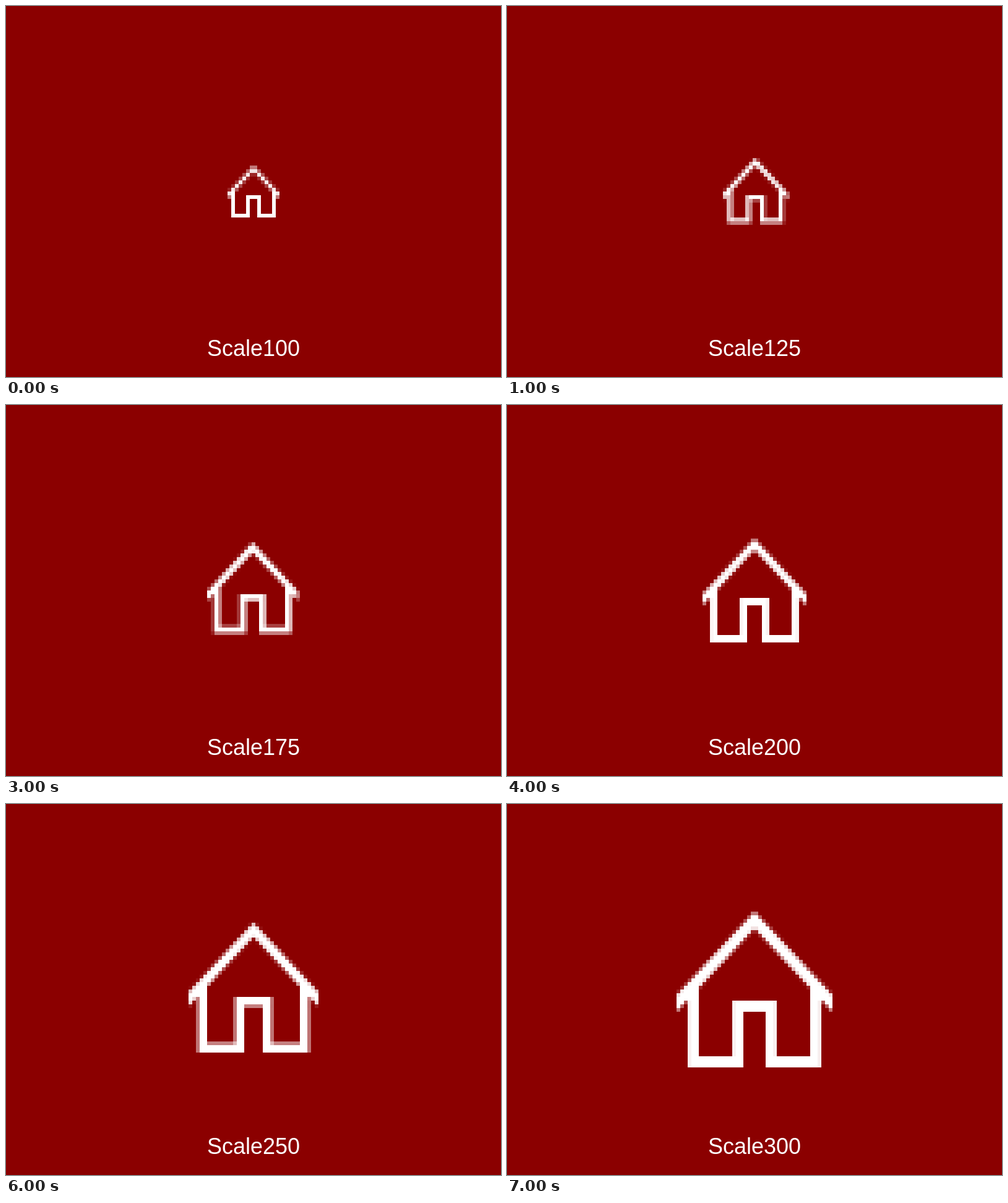
Write an HTML page with a canvas that moves like this. It is 800 by 600 pixels and loops after 8000 ms.

```html
<!DOCTYPE html>
<html lang="en">
<head>
<meta charset="utf-8">
<title>Icon scaling</title>
<style>
  html, body { margin: 0; width: 800px; height: 600px; overflow: hidden; background: #8b0000; }
  canvas { display: block; }
</style>
</head>
<body>
<canvas id="stage" width="800" height="600"></canvas>
<script>
const STEP_MS = 1000;
const ZOOM = 6;
// Scale in percent and left edge of the icon on the stage
const STEPS = [[100, 358], [125, 349], [150, 337], [175, 325],
               [200, 316], [225, 306], [250, 295], [300, 274]];

const ctx = document.getElementById('stage').getContext('2d');
const icon = document.createElement('canvas');
icon.width = icon.height = 48;
const pen = icon.getContext('2d');

// House outline on a 14 x 14 unit grid
const house = new Path2D('M0 7.5 L7 0 L14 7.5 V9 L7 1.5 L0 9 Z');
function addBar(left, top, right, bottom) {
  house.rect(left, top, right - left, bottom - top);
}
addBar(1.02, 6.7, 2, 14);
addBar(12, 6.7, 12.98, 14);
addBar(1.02, 13, 6, 14);
addBar(8, 13, 12.98, 14);
addBar(5.02, 8, 6, 14);
addBar(8, 8, 8.98, 14);
addBar(5.02, 8, 8.98, 9);

function drawIcon(scale) {
  pen.setTransform(1, 0, 0, 1, 0, 0);
  pen.clearRect(0, 0, icon.width, icon.height);
  pen.scale(scale, scale);
  pen.fillStyle = '#fff';
  pen.fill(house);
}

function draw(step) {
  const [percent, left] = STEPS[step];
  const scale = percent / 100;
  const top = 300 - ZOOM * Math.ceil(7 * scale);
  drawIcon(scale);

  ctx.fillStyle = '#8b0000';
  ctx.fillRect(0, 0, 800, 600);
  ctx.imageSmoothingEnabled = false;
  ctx.drawImage(icon, left, top, icon.width * ZOOM, icon.height * ZOOM);

  ctx.fillStyle = '#fff';
  ctx.font = '36px "Liberation Sans", Arial, sans-serif';
  ctx.textAlign = 'center';
  ctx.fillText('Scale' + percent, 400, 566);
}

const start = performance.now();
let shown = -1;
function tick() {
  const step = Math.floor((performance.now() - start) / STEP_MS) % STEPS.length;
  if (step !== shown) draw(shown = step);
  requestAnimationFrame(tick);
}
tick();
</script>
</body>
</html>
```
